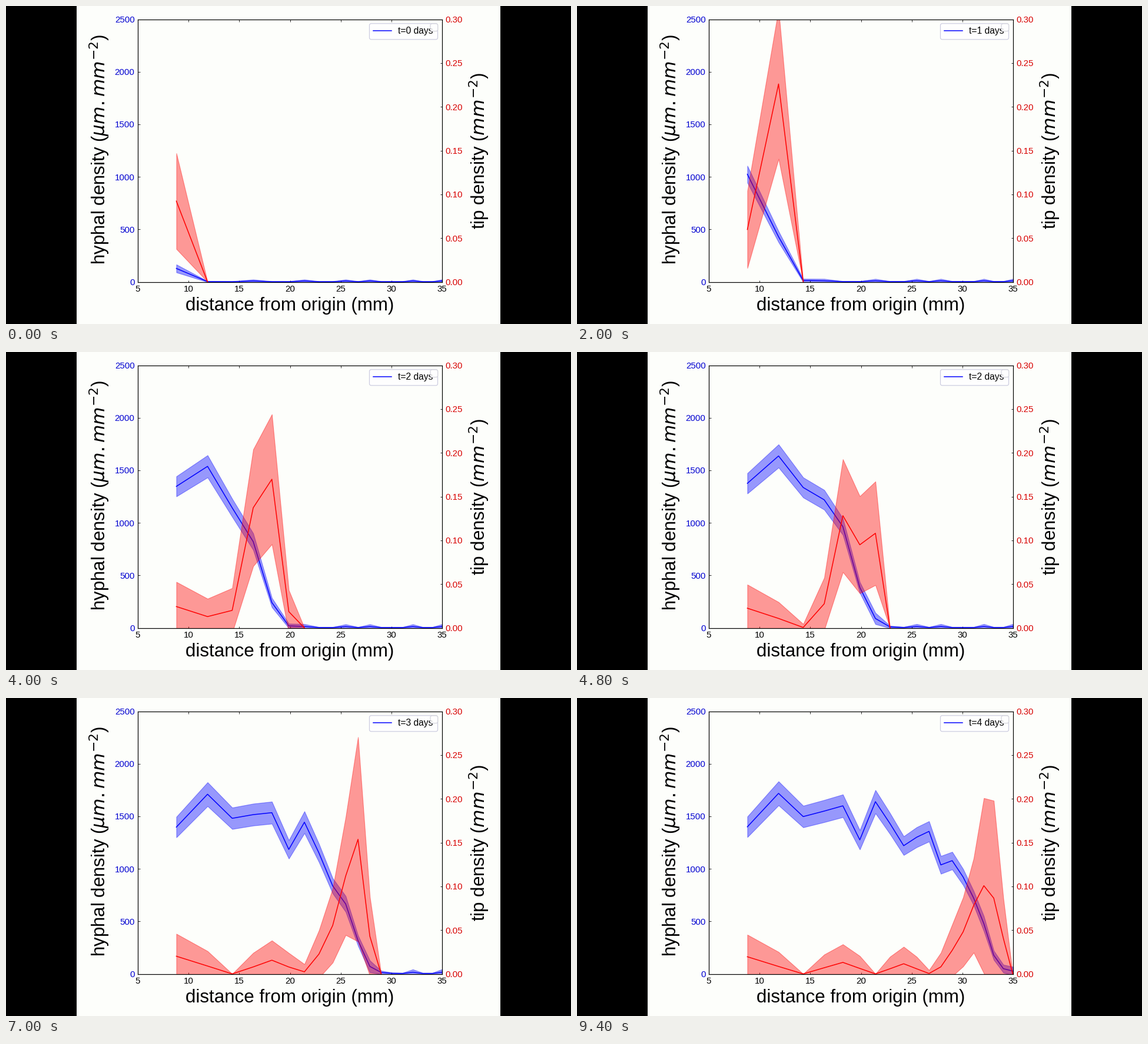
Recreate the animation shown at these times as a matplotlib script. Size 960x540 px, loop 9600 ms.

```python
import math

import matplotlib.pyplot as plt
import numpy as np
from matplotlib.animation import FuncAnimation
from matplotlib.patches import FancyBboxPatch, Rectangle

W, H, DPI = 960, 540, 80
PX = 72 / DPI  # points per pixel
FRAMES, INTERVAL = 48, 200
LEFT, RIGHT, TOP, BOTTOM = 224, 741, 22.5, 468.5

plt.rcParams["font.family"] = "Liberation Sans"

# Rings of equal area around the origin, radius in mm
ring = np.arange(19)
radius = np.sqrt(77.4 + 63.6 * ring)

# Density each ring settles at, and faint noise seen before growth arrives
plateau = np.interp(ring, [0, 1, 2, 4, 5, 6, 8, 10, 11, 12, 18],
                    [1400, 1720, 1500, 1610, 1290, 1670, 1280, 1520, 1230,
                     1400, 1250])
noise = np.where(np.isin(ring, [3, 6, 9, 11, 15, 18]), 12, 3)

REACH = 3.3  # how far ahead of the front tips are found, mm


def behind_front(frame):
    """Distance of every ring behind the advancing front, in mm."""
    return np.interp(frame, [0, 10, 35, 47], [7, 10.95, 25.6, 31.6]) - radius


def hyphae(frame):
    d = behind_front(frame)
    ahead, behind = np.maximum(-d, 0), np.maximum(d, 0)
    grown = np.where(d > 0, 1 - 0.55 * np.exp(-behind / 3),
                     0.45 * np.exp(-(ahead / 1.31) ** 1.5))
    growth = plateau * grown
    background = noise * (1 + frame / 40) * (1 - grown)
    mean = growth + 0.7 * background
    spread = np.minimum(growth, 28 + 0.05 * growth) + 1.2 * background
    return mean, spread


def tips(frame):
    """Pulse riding on the front, with a weak tail left behind it."""
    d = behind_front(frame)
    offset = d + 0.9
    width = np.where(offset > 0, 2.4, 1.7)
    pulse = 0.15 * (plateau / 1500) ** 3 * np.exp(-(offset / width) ** 2)
    tail = 0.03 * np.exp(-radius / 20) * np.cos(math.pi * ring / 4) ** 2
    tail = tail * (1 + 1.3 * np.exp(-np.maximum(d, 0) / 5)) * (d > 0)
    mean = np.where(d > -REACH, pulse + tail, 0)
    late = np.clip((frame - 24) / 20, 0, 1)
    spread = 0.18 * np.sqrt(mean) * (1 + 1.2 * late * np.exp(-(d + 1.2) ** 2))
    return mean, spread


fig = plt.figure(figsize=(W / DPI, H / DPI), dpi=DPI, facecolor="black")
fig.add_artist(Rectangle((120 / W, 0), 720 / W, 1, color="#fdfefb", lw=0,
                         transform=fig.transFigure, zorder=-1))

ax = fig.add_axes([LEFT / W, 1 - BOTTOM / H,
                   (RIGHT - LEFT) / W, (BOTTOM - TOP) / H])
ax.patch.set_visible(False)
ax2 = ax.twinx()
ax.set_xlim(5, 35)
ax.set_ylim(0, 2500)
ax2.set_ylim(0, 0.3)
ax.set_xticks(range(5, 36, 5))
ax.set_yticks(range(0, 2501, 500))
ax2.set_yticks(np.arange(7) * 0.05)
ax2.yaxis.set_major_formatter("{x:.2f}")

ticks = dict(direction="in", length=3.5 * PX, width=0.8 * PX, pad=5.5 * PX,
             labelsize=15 * PX)
ax.tick_params(axis="x", top=True, **ticks)
ax.tick_params(axis="y", labelcolor="#0000d0", **ticks)
ax2.tick_params(axis="y", labelcolor="#d80000", **ticks)
for a in (ax, ax2):
    for spine in a.spines.values():
        spine.set_linewidth(1.1 * PX)


def band(axes, color):
    fill = axes.fill_between(radius, radius * 0, facecolor=color,
                             edgecolor=color, alpha=0.4, lw=1.1 * PX)
    line, = axes.plot(radius, radius * 0, color=color, lw=1.5 * PX)
    return fill, line


def set_band(parts, mean, spread, count):
    fill, line = parts
    r, mean, spread = radius[:count], mean[:count], spread[:count]
    upper = np.column_stack([r, mean + spread])
    lower = np.column_stack([r, mean - spread])
    fill.set_verts([np.vstack([upper, lower[::-1]])])
    line.set_data(r, mean)


blue = band(ax, "blue")
red = band(ax2, "red")

# Labels and legend in pixel coordinates
stage = fig.add_axes([0, 0, 1, 1], zorder=5)
stage.set_xlim(0, W)
stage.set_ylim(H, 0)
stage.axis("off")


def label(x, y, text, size, **kw):
    return stage.text(x, y, text, fontsize=size * PX, va="baseline",
                      rotation_mode="anchor", **kw)


def box(x, y, w, h, edge, z):
    stage.add_patch(FancyBboxPatch(
        (x, y), w, h, boxstyle="round,pad=0,rounding_size=3",
        facecolor=(1, 1, 1, 0.8), edgecolor=edge, lw=1.2 * PX, zorder=z))


label(482, 517, "distance from origin (mm)", 31.25, ha="center")
label(169, 243, r"hyphal density ($\mu m.mm^{-2}$)", 31.25, ha="center",
      rotation=90)
label(814, 246.5, r"tip density ($mm^{-2}$)", 31.25, ha="center", rotation=90)

box(617.5, 29.8, 116, 27, "#cccce0", 1)
stage.plot([623.5, 655], [42.3, 42.3], color="blue", lw=1.5 * PX, zorder=2)
days = label(666.5, 47.5, "", 15.6, zorder=2)
box(721, 30, 12.7, 12.8, "#d4d4dc", 4)


def update(frame):
    set_band(blue, *hyphae(frame), len(ring))
    # the tip curve ends at the first empty ring ahead of the front
    occupied = np.count_nonzero(behind_front(frame) > -REACH)
    set_band(red, *tips(frame), occupied + 1)
    days.set_text(f"t={math.ceil(frame / 12 - 0.5)} days")
    return (*blue, *red, days)


anim = FuncAnimation(fig, update, frames=FRAMES, interval=INTERVAL,
                     repeat=True, repeat_delay=0, blit=False)
plt.show()
```
